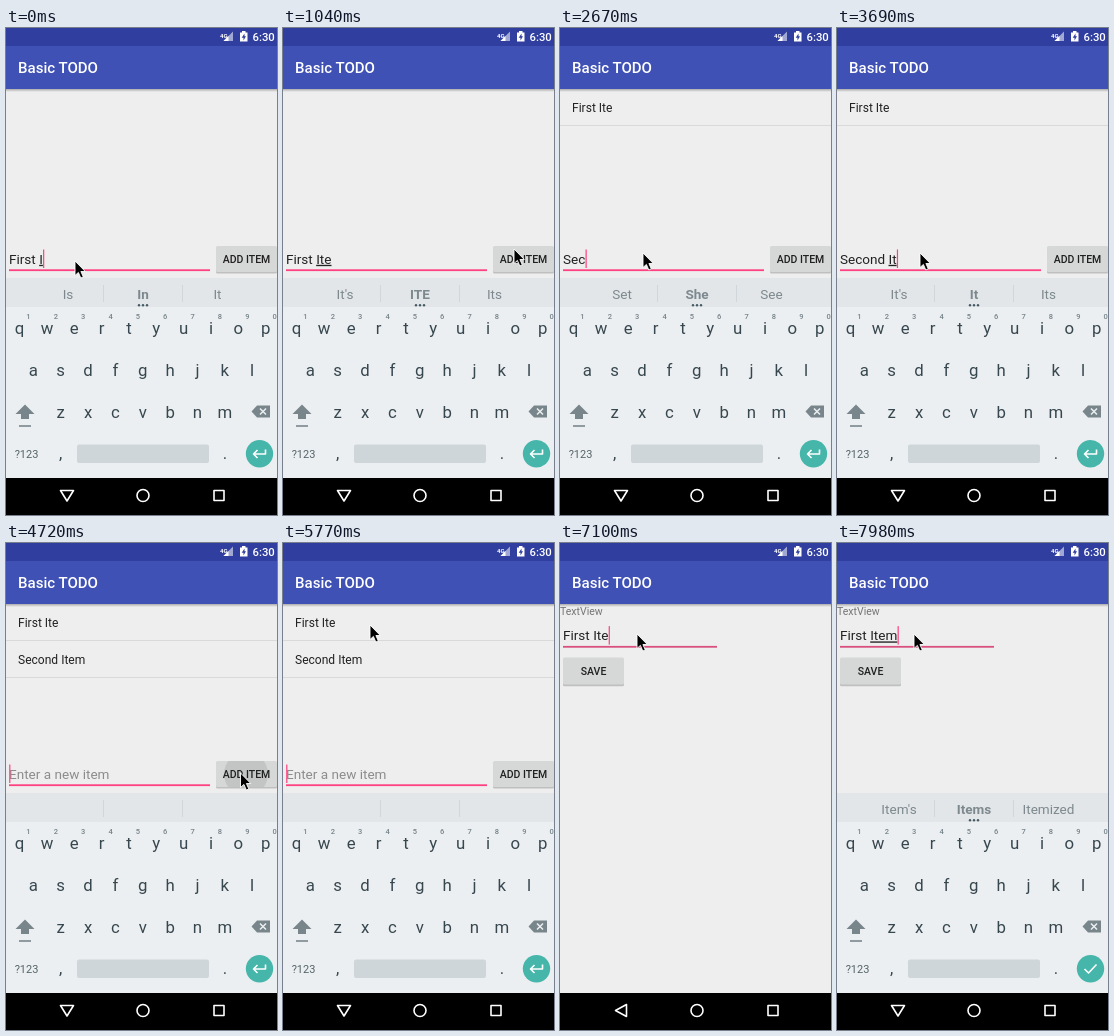
An HTML page that plays this animation: 271x487 px, repeating every 8 s.

```html
<!DOCTYPE html>
<html lang="en">
<head>
<meta charset="utf-8">
<title>Basic TODO</title>
<style>
  html, body { margin: 0; width: 100%; height: 100%; overflow: hidden; background: #000; }
  svg { display: block; width: 100%; height: 100%; font-family: Roboto, sans-serif; }
  text { white-space: pre; }
  .mid { text-anchor: middle; }
  .button { font-size: 10.5px; font-weight: 500; fill: #202020; text-anchor: middle; }
  .item { font-size: 12.05px; fill: #222; }
  .entry { font-size: 13.55px; fill: #222; }
  .hint { font-size: 13.55px; fill: #8c8c8c; }
  .word { text-decoration: underline; text-decoration-thickness: 1px; text-underline-offset: 1.5px; }
  .key { font-size: 16.8px; fill: #37474f; text-anchor: middle; }
  .digit { font-size: 7.5px; font-weight: 500; fill: #75838a; text-anchor: middle; }
  .pick { font-size: 13.55px; fill: #7d898e; text-anchor: middle; }
  .line { fill: none; stroke: #fff; stroke-width: 1.6; stroke-linejoin: round; }
</style>
</head>
<body>
<svg viewBox="0 0 271 487" preserveAspectRatio="none">
  <defs>
    <linearGradient id="shade" x2="0" y2="1">
      <stop stop-color="#000" stop-opacity=".28"/><stop offset="1" stop-color="#000" stop-opacity="0"/>
    </linearGradient>
    <clipPath id="addClip"><rect x="210" y="218" width="61" height="26" rx="1.5"/></clipPath>
    <clipPath id="page"><rect y="18" width="271" height="432"/></clipPath>
    <g id="bar">
      <rect y="18" width="271" height="432" fill="#eee"/>
      <rect y="18" width="271" height="43" fill="#3f51b5"/>
      <rect y="61" width="271" height="3" fill="url(#shade)"/>
      <text x="12" y="45.3" font-size="15.06" font-weight="500" fill="#fff">Basic TODO</text>
    </g>
  </defs>

  <g id="list">
    <use href="#bar"/>
    <g id="item1"><text class="item" x="12" y="83.5">First Ite</text><path d="M0 97.5H271" stroke="#d9d9d9"/></g>
    <g id="item2"><text class="item" x="12" y="120.5">Second Item</text><path d="M0 134.5H271" stroke="#d9d9d9"/></g>
    <rect x="210" y="219" width="61" height="26.5" rx="1.5" fill="#000" opacity=".2"/>
    <rect x="210" y="218" width="61" height="26" rx="1.5" fill="#d6d7d7"/>
    <g clip-path="url(#addClip)"><circle id="ripple" cx="240" cy="231" fill="#000"/></g>
    <text class="button" x="240.5" y="235">ADD ITEM</text>
  </g>

  <g clip-path="url(#page)"><g id="edit">
    <use href="#bar"/>
    <text x="0" y="72.3" font-size="10.5" fill="#757575">TextView</text>
    <rect x="3" y="116" width="61" height="27.3" rx="1.5" fill="#000" opacity=".2"/>
    <rect x="3" y="114.5" width="61" height="27" rx="1.5" fill="#d6d7d7"/>
    <text class="button" x="33.5" y="132">SAVE</text>
  </g></g>

  <rect width="271" height="18" fill="#303f9f"/>
  <g fill="#fff">
    <text x="214" y="9.5" font-size="6" font-weight="700">4G</text>
    <path d="M227 3.5V13H217.5Z" opacity=".55"/><path d="M222.5 8V13H217.5Z"/>
    <path d="M234 4.5H236V3H239.500V4.500H241.500V13.500H234Z"/>
    <path d="M238.500 5.500L235.700 9.700H237.500V12.500L240 8.300H238.500Z" fill="#303f9f"/>
    <text x="246.500" y="13" font-size="11.300" font-weight="500">6:30</text>
  </g>

  <rect y="450" width="271" height="37" fill="#000"/>
  <path id="back" class="line"/>
  <circle class="line" cx="137" cy="467.5" r="6"/>
  <rect class="line" x="208" y="462.5" width="10" height="10"/>

  <g id="board">
    <rect y="250" width="271" height="200" fill="#eceff1"/>
    <rect y="250" width="271" height="29" fill="#e2e6e9"/>
    <path d="M97.5 257V274M176.5 257V274" stroke="#d0d6d9"/>
    <g id="dots" fill="#455a64"><circle cx="133" cy="277.300" r="1.200"/><circle cx="137" cy="277.300" r="1.200"/><circle cx="141" cy="277.300" r="1.200"/></g>
    <g id="keys"></g>
    <path d="M19 376.500L28.500 386H23V391H15V386H9.500Z" fill="#78868c"/>
    <path d="M13 398H25" stroke="#78868c" stroke-width="1.600"/>
    <path d="M245.500 383.500L251 377.500H264V389.500H251Z" fill="#78868c"/>
    <path d="M254 380.500L260 386.500M260 380.500L254 386.500" stroke="#eceff1" stroke-width="1.500"/>
    <text class="mid" x="20.500" y="430" font-size="11" fill="#546469">?123</text>
    <rect x="71" y="416.500" width="132" height="18.500" rx="2" fill="#cfd6d9"/>
    <circle cx="253.500" cy="425.700" r="13.700" fill="#46b5aa"/>
    <path id="enter" class="line"/>
  </g>

  <path id="pointer" d="M0 0V14.500L3.400 11.400L5.800 17L8.300 15.900L5.900 10.500H10.300Z" fill="#000" stroke="#fff" stroke-width=".9"/>
</svg>
<script>
const $ = id => document.getElementById(id);
const LOOP = 8000, TICK = 147.8;

function add(parent, tag, attrs, text = '') {
  const el = document.createElementNS('http://www.w3.org/2000/svg', tag);
  for (const name in attrs) el.setAttribute(name, attrs[name]);
  el.textContent = text;
  return parent.appendChild(el);
}
const show = (el, on) => el.setAttribute('visibility', on ? 'inherit' : 'hidden');

// A text entry; mid is the vertical centre of its text.
function makeField(parent, mid, right, hint) {
  const line = add(parent, 'rect', { x: 3, y: mid + 10.3, width: right - 3, height: 1.8 });
  const label = add(parent, 'text', { class: 'hint', x: 3, y: mid + 4.8 }, hint);
  const text = add(parent, 'text', { class: 'entry', x: 3, y: mid + 4.8 });
  const plain = add(text, 'tspan', {});
  const word = add(text, 'tspan', { class: 'word' });
  const caret = add(parent, 'rect', { y: mid - 9.5, width: 1.2, height: 18.5, fill: '#ff4081' });
  return (value, caretOn, atStart, color) => {
    [plain.textContent, word.textContent] = value.split('|');
    show(label, value === '|');
    show(caret, caretOn);
    const width = atStart || value === '|' ? 0 : text.getComputedTextLength();
    caret.setAttribute('x', 3.2 + width);
    line.setAttribute('fill', color);
  };
}
const setNew = makeField($('list'), 231, 204, 'Enter a new item');
const setEdit = makeField($('edit'), 92.6, 157, '');

[['qwertyuiop', 13.6, 306], ['asdfghjkl', 27.3, 348], ['zxcvbnm', 54.7, 390]].forEach(([row, x, y]) =>
  [...row].forEach((c, i) => add($('keys'), 'text', { class: 'key', x: x + i * 27.35, y }, c)));
[...'1234567890'].forEach((c, i) => add($('keys'), 'text', { class: 'digit', x: 22.5 + i * 27.35, y: 291 }, c));
add($('keys'), 'text', { class: 'key', x: 54.7, y: 431 }, ',');
add($('keys'), 'text', { class: 'key', x: 219, y: 431 }, '.');
const picks = [62, 137, 211.5].map((x, i) =>
  add($('board'), 'text', { class: 'pick', x, y: 270.5, 'font-weight': i === 1 ? 700 : 400 }));

// [tick, value]; the part after the bar is the underlined word being typed.
const typed = [[0, 'First |I'], [2, 'First |It'], [3, 'First |Ite'], [9, '|'],
  [15, '|S'], [16, '|Se'], [18, 'Sec|'], [19, '|Seco'], [20, '|Secon'], [21, '|Second'], [22, 'Second |'],
  [24, 'Second |I'], [25, 'Second |It'], [26, 'Second |Ite'], [27, 'Second |Item'], [32, '|']];
const edited = [[0, 'First Ite|'], [50, 'First |Ite'], [53, 'First |Item']];
const offers = [[0, "Is In It"], [2, "It's It Its"], [4, "It's ITE Its"], [9, ''],
  [16, 'So S She'], [17, 'Set She See'], [19, 'Sec Second Secret'], [21, "Second's Second Seconds"],
  [22, 'time one half'], [24, 'Is In It'], [25, "It's It Its"], [27, "It's ITE Its"],
  [28, "Item's Items Itemized"], [32, ''], [50, "It's ITE Its"], [54, "Item's Items Itemized"]];
const caretOn = [[0, 1], [7, 0], [9, 1], [13, 0], [15, 1], [31, 0], [32, 1], [35, 0], [39, 1], [46, 0], [47, 1]];
// [tick, offset, opacity]
const boardPose = [[0, 0, 1], [43, 12, .5], [44, 0, 0], [49, 19, .3], [50, 0, 1]];
const editPose = [[0, 0, 0], [42, 24, .35], [43, .9, 1], [44, 0, 1]];
const ripple = [[0, 0, 0], [9, 22, .09], [10, 34, .06], [11, 0, 0], [32, 22, .09], [33, 34, .06], [34, 0, 0]];
// [tick, x, y]
const path = [[0, 69, 233], [3, 69, 233], [6, 210, 223], [7, 231, 221], [10, 231, 221], [13, 83, 225],
  [28, 83, 225], [31, 234.5, 230], [32, 234.5, 230], [35, 87, 82], [44, 87, 82], [46, 77, 91], [55, 77, 91]];

const at = (list, k) => list.findLast(e => e[0] <= k);

function pointerAt(k) {
  const i = path.findIndex(e => e[0] > k);
  const [a, x, y] = path[i - 1], [b, x2, y2] = path[i];
  const p = (k - a) / (b - a);
  return `translate(${x + (x2 - x) * p} ${y + (y2 - y) * p})`;
}

function pose(el, [, dy, alpha]) {
  el.setAttribute('transform', `translate(0 ${dy})`);
  el.setAttribute('opacity', alpha);
  show(el, alpha > 0);
}

function draw(t) {
  const k = Math.floor((t + 12) / TICK);
  const caret = at(caretOn, k)[1];
  show($('item1'), k >= 9);
  show($('item2'), k >= 32);
  setNew(at(typed, k)[1], caret, false, '#ff4081');
  setEdit(at(edited, k)[1], caret, k < 47, k < 44 ? '#ff4081' : '#d9507f');
  const [, r, alpha] = at(ripple, k);
  $('ripple').setAttribute('r', r);
  $('ripple').setAttribute('opacity', alpha);
  pose($('edit'), at(editPose, k));
  pose($('board'), at(boardPose, k));

  const words = at(offers, k)[1].split(' ');
  picks.forEach((el, i) => el.textContent = words[i] || '');
  show($('dots'), words.length > 1);
  $('enter').setAttribute('d', k < 49
    ? 'M259.500 421.500V426H248M251.500 422L247.500 426L251.500 430' : 'M247.500 426L251.500 430L259.500 421.500');
  $('back').setAttribute('d', k > 42 && k < 49
    ? 'M66.500 461.500V473.500L55.500 467.500Z' : 'M54.500 462.500H67.500L61 473Z');
  $('pointer').setAttribute('transform', pointerAt(k));
}

function frame() {
  draw(performance.now() % LOOP);
  requestAnimationFrame(frame);
}
frame();
</script>
</body>
</html>
```
